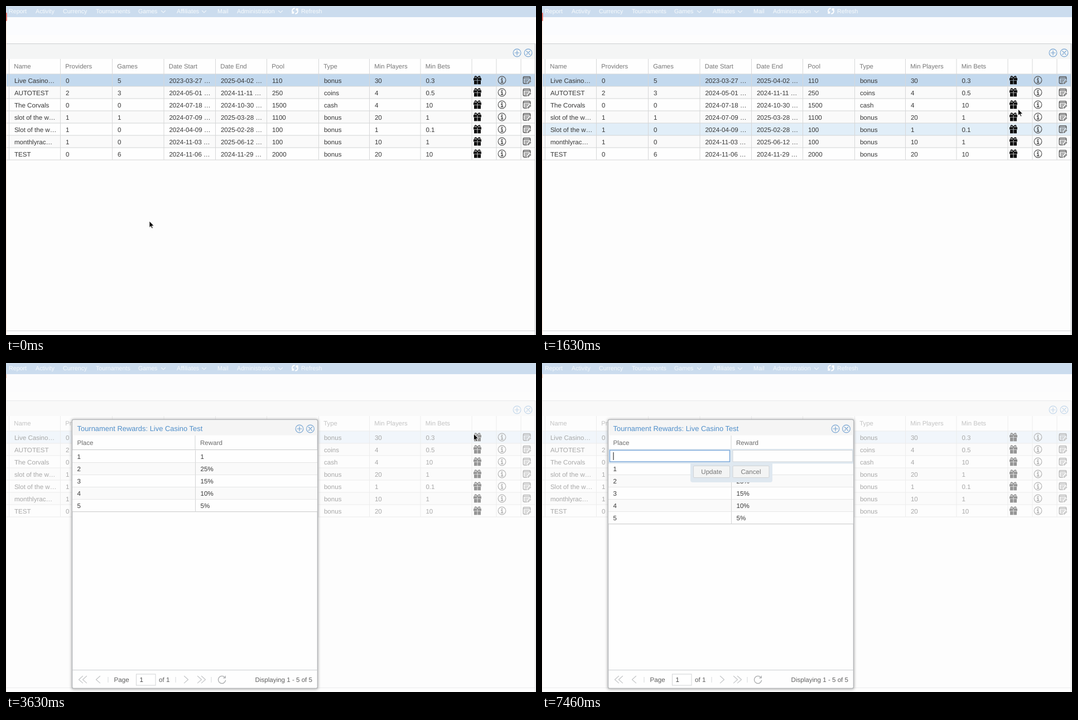
An HTML page that plays this animation: 950x590 px, repeating every 8 s.

```html
<!DOCTYPE html>
<html lang="en">
<head>
<meta charset="utf-8">
<title>Tournament rewards</title>
<style>
html, body { margin: 0; width: 100%; height: 100%; overflow: hidden; background: #fdfdfd; }
svg { display: block; width: 950px; height: 590px; font-family: "Liberation Sans", Arial, sans-serif; text-rendering: geometricPrecision; }
text { white-space: pre; }
</style>
</head>
<body>
<svg id="stage" viewBox="0 0 950 590"></svg>
<script>
const LOOP = 8000;
const stage = document.getElementById('stage');

const rect = (x, y, w, h, fill, more = '') => `<rect x="${x}" y="${y}" width="${w}" height="${h}" fill="${fill}" ${more}/>`;
const path = (d, stroke, width = 1, fill = 'none') =>
  `<path d="${d}" stroke="${stroke}" stroke-width="${width}" fill="${fill}" stroke-linecap="round" stroke-linejoin="round"/>`;
const text = (x, y, str, size, fill, more = '') => `<text x="${x}" y="${y}" font-size="${size}" fill="${fill}" ${more}>${str}</text>`;
const group = (id, body, more = '') => `<g id="${id}" ${more}>${body}</g>`;
const at = (x, y, body) => `<g transform="translate(${x} ${y})">${body}</g>`;
const each = (list, fn) => list.map(fn).join('');
const CENTER = 'text-anchor="middle"';

// Icons, drawn around their own centre
const circled = d => `<circle r="6.9" fill="none" stroke="#76a4d2" stroke-width="1.1"/>` + path(d, '#76a4d2', 1.2);
const plus = circled('M-4 0H4M0 -4V4');
const cross = circled('M-3 -3L3 3M3 -3L-3 3');
const gift = rect(-7, -3.8, 6.6, 4.2, '#0c0c0c') + rect(0.4, -3.8, 6.6, 4.2, '#0c0c0c') +
  rect(-6, 1, 5.6, 6.4, '#0c0c0c') + rect(0.4, 1, 5.6, 6.4, '#0c0c0c') +
  path('M-.6 -4C-2 -8 -5.5 -7.5 -4.4 -4.4M.6 -4C2 -8 5.5 -7.5 4.4 -4.4', '#0c0c0c', 1.7);
const info = `<circle r="6.8" fill="none" stroke="#555" stroke-width="1.2"/><circle cy="-3.4" r="1.2" fill="#444"/>` +
  path('M-1.4 -.8H.3V3.8M-1.6 3.8H1.8', '#444', 1.4);
const edit = path('M6.3 -1V-4.5Q6.3 -6.3 4.5 -6.3H-4.7Q-6.3 -6.3 -6.3 -4.5V4Q-6.3 6 -4.5 6H0M-6 -3.8H6', '#4c4c4c', 1.3) +
  path('M-3.7 -1H3.5M-3.7 1.2H2M-3.7 3.4H0', '#555', 1) + path('M2 6L2.6 3.8L6 .6L7.2 2L4 5.3Z', '#4c4c4c', 1, '#bbb');
const reload = (color, width) => path('M5 -4.4A6.6 6.6 0 1 0 6.6 1.2M6.2 -6.6V-3.2H2.8', color, width);
const sync = path('M-1 -4.8A4.8 4.8 0 0 0 -3.4 3.5M-5 3.8H-2.6V1.4M1 4.8A4.8 4.8 0 0 0 3.4 -3.5M5 -3.8H2.6V-1.4', '#fff', 1.9);

// Main page
const rows = [
  ['Live Casino…', '0', '5', '2023-03-27 …', '2025-04-02 …', '110', 'bonus', '30', '0.3'],
  ['AUTOTEST', '2', '3', '2024-05-01 …', '2024-11-11 …', '250', 'coins', '4', '0.5'],
  ['The Corvals', '0', '0', '2024-07-18 …', '2024-10-30 …', '1500', 'cash', '4', '10'],
  ['slot of the w…', '1', '1', '2024-07-09 …', '2025-03-28 …', '1100', 'bonus', '20', '1'],
  ['Slot of the w…', '1', '0', '2024-04-09 …', '2025-02-28 …', '100', 'bonus', '1', '0.1'],
  ['monthlyrac…', '1', '0', '2024-11-03 …', '2025-06-12 …', '100', 'bonus', '10', '1'],
  ['TEST', '0', '6', '2024-11-06 …', '2024-11-29 …', '2000', 'bonus', '20', '10'],
];
const heads = ['Name', 'Providers', 'Games', 'Date Start', 'Date End', 'Pool', 'Type', 'Min Players', 'Min Bets'];
const edges = [5.5, 97.5, 190.5, 283, 375.5, 467.5, 560.5, 651.5, 743, 835, 879, 923];
const rowTop = i => 122 + 22 * i;

const page =
  rect(0, 0, 950, 590, '#fdfdfd') + rect(0, 20, 950, 32, '#fbfcfe') +
  rect(0, 67, 949, 28, '#f4f5f5') + rect(0, 67, 949, 1.2, '#d2d4d6') +
  rect(0, 95, 948, 27, '#fefefe') +
  each(rows, (r, i) => rect(0, rowTop(i), 948, 22, i % 2 ? '#fafafa' : '#fefefe', `id="row${i}"`)) +
  each(rows, (r, i) => rect(0, rowTop(i) + 21.5, 948, 1, '#d4d5d6')) + rect(0, 121.5, 948, 1, '#d4d8dc') +
  each(edges, x => rect(x - .5, 95, 1, 181, '#d6d7d8')) +
  each(heads, (h, i) => text(edges[i] + 8.7, 112, h, 11.4, '#777')) +
  each(rows, (r, i) => each(r, (c, j) => text(edges[j] + 9.4, rowTop(i) + 15.5, c, 11.6, '#383838')) +
    at(845, rowTop(i) + 11, gift) + at(889, rowTop(i) + 11, info) + at(933.5, rowTop(i) + 11, edit)) +
  at(916, 84, plus) + at(936, 84, cross) +
  rect(0, 582, 948, 1, '#d6d7d8') + rect(947.8, 67, 1.4, 523, '#c6c8ca') + rect(0, 20, 1, 570, '#fbe3d6');

const menu = [[5, 'Report'], [53, 'Activity'], [102, 'Currency'], [161, 'Tournaments'], [237, 'Games', 282],
  [306, 'Affiliates', 355], [379, 'Mail'], [414, 'Administration', 492], [529, 'Refresh']];
const nav = rect(0, 0, 950, 20, '#cbdcee') + rect(0, 0, 950, 1, '#d3e0ed') +
  each(menu, ([x, label, arrow]) => text(x, 12.8, label, 10.7, '#f8fbfd') +
    (arrow ? path(`M${arrow - 3.5} 8.5l3.5 3.4l3.5 -3.4`, '#f0f5fa', 1.2) : '')) + at(518, 9, sync);

// Rewards window
const rewards = ['1', '25%', '15%', '10%', '5%'];
const rewardRows = each(rewards, (r, i) => {
  const y = 156.5 + 22 * i;
  return rect(119, y, 439, 22, i % 2 ? '#fafafa' : '#fefefe') + rect(119, y + 21.6, 439, 1.1, '#cbcccd') +
    rect(339, y, 1, 22, '#d2d3d4') + text(127.5, y + 15.3, i + 1, 11.6, '#383838') + text(348.5, y + 15.3, r, 11.6, '#383838');
});
const button = (x, label) => rect(x + .5, 184.5, 65, 21, '#f3f4f4', 'stroke="#d0d3d5" rx="1.5"') +
  text(x + 33, 199, label, 11.6, '#777', CENTER);
const editor = rect(119, 154, 439, 26.5, '#dfe9f1') +
  '<path d="M266 180H413V210Q413 214 409 214H270Q266 214 266 210Z" fill="#dfe8f0"/>' +
  rect(121.5, 156.5, 215, 20.5, '#fff', 'stroke="#78a6d9" stroke-width="1.4"') +
  rect(342, 156.5, 214.5, 20.5, '#fefefe', 'stroke="#d3d6d9"') +
  button(271, 'Update') + button(341.5, 'Cancel') + rect(127.5, 160, 1.1, 14, '#222', 'id="caret"');
const chevron = (x, dir) => path(`M${x + 3.5 * dir} 561.5l${-7 * dir} 6.2l${7 * dir} 6.2`, '#c3c5c7', 1.2);
const pager = rect(119, 550, 439, 1.2, '#d2d4d6') +
  chevron(134, 1) + chevron(141, 1) + chevron(165, 1) + chevron(323, -1) + chevron(347, -1) + chevron(354, -1) +
  each([183, 304, 368], x => rect(x - .5, 563, 1, 10, '#d6d8da')) +
  text(193.5, 572, 'Page', 11.7, '#606060') + rect(233.5, 558, 34.5, 20, '#fff', 'stroke="#d2d4d6"') +
  text(239.5, 572, '1', 11.7, '#444') + text(274, 572, 'of 1', 11.7, '#606060') +
  at(387, 568, reload('#a8aaac', 1.3)) + text(549, 572, 'Displaying 1 - 5 of 5', 11.6, '#606060', 'text-anchor="end"');
const spokes = each([...Array(8).keys()], i =>
  `<path d="M0 -3.6V-6.4" stroke="#333" stroke-width="2" opacity="${(.15 + i * .11).toFixed(2)}" transform="rotate(${i * 45})"/>`);
const loading = rect(119, 130, 439, 453, '#fefefe', 'opacity=".6"') +
  rect(122, 543.5, 434, 6, '#dcdddf', 'rx="3"') + rect(306, 334.5, 65, 45.5, '#e0e0e1', 'rx="1.5"') +
  at(338, 348.5, group('spinner', spokes)) + text(338.5, 370.8, 'Loading...', 12, '#666', CENTER);
const dialog =
  rect(118.5, 101.5, 440, 482, '#fefefe', 'rx="2.5" stroke="#b2b4b6" stroke-width="1.5" filter="url(#shadow)"') +
  rect(119.2, 102.2, 438.6, 27.3, '#f5f5f5', 'rx="2"') +
  text(127.5, 122.3, 'Tournament Rewards: Live Casino Test', 12.95, '#508fca') +
  at(526, 118, plus) + at(545.5, 118, cross) +
  text(127.5, 146.5, 'Place', 11.6, '#6c6c6c') + text(348, 146.5, 'Reward', 11.6, '#6c6c6c') +
  rect(338.5, 130, 1, 26, '#d2d3d4') + rect(119, 155, 439, 1.1, '#cbcccd') +
  group('rewards', rewardRows) + pager + group('editor', editor) + group('loading', loading);

const arrow = path('M0 0V11.3L2.6 8.9L4.5 13L6.3 12.2L4.5 8.2H8Z', '#fff', .8, '#000');
const hand = path('M1 7.5V1.4Q1 0 2.1 0T3.2 1.4V5Q5 4.2 5.3 5.4Q7 4.8 7.3 6Q9 5.6 9.2 7.2V10Q9 12.5 7.9 14H2.8Q1 11.5 -1.8 8.8Q-2.6 7.4 -1 7.2Z', '#111', 1.1, '#fff') +
  path('M3.7 8.5V11.5M5.5 8.5V11.5', '#111', .8);

stage.innerHTML =
  '<defs><filter id="shadow" x="-5%" y="-5%" width="110%" height="110%"><feDropShadow dx="0" dy=".5" stdDeviation="2.6" flood-color="#000" flood-opacity=".4"/></filter></defs>' +
  page + group('mask', rect(0, 20, 950, 570, '#fefefe', 'opacity=".57"')) + nav +
  rect(0, 12, 1.8, 15, '#e3655c', 'id="mark" rx=".8"') + rect(0, 20, 1.2, 7, '#f6c9b4', 'id="paleMark"') +
  group('dialog', dialog) + group('cursor', group('arrow', arrow) + group('hand', hand));

const el = Object.fromEntries([...stage.querySelectorAll('[id]')].map(n => [n.id, n]));
const show = (id, on) => el[id].setAttribute('visibility', on ? 'inherit' : 'hidden');

// Pointer path: time, x, y
const track = [[0, 257, 386], [1010, 257, 386], [1130, 360, 376], [1300, 665, 312], [1400, 802, 262], [1460, 836, 245.5],
  [1530, 837, 244], [1640, 855, 180], [1750, 861.5, 142], [1830, 862.5, 139.5], [2000, 850, 132], [2100, 847.5, 130.5],
  [3600, 847.5, 130.5], [3630, 839, 127.5], [3800, 752, 123], [4050, 620, 121], [4250, 550, 119], [4430, 528, 117],
  [4700, 524.5, 116], [7110, 524.5, 116], [7250, 440, 146], [7430, 300, 165], [LOOP, 300, 165]];
function pointer(t) {
  const i = Math.max(1, track.findIndex(p => p[0] >= t));
  const [t0, x0, y0] = track[i - 1], [t1, x1, y1] = track[i];
  const k = (t - t0) / (t1 - t0);
  return [x0 + (x1 - x0) * k, y0 + (y1 - y0) * k];
}

function draw(t) {
  const open = t >= 2230, editing = t >= 5130, busy = open && t < 3030;
  const [x, y] = pointer(t);
  // The row highlight trails the pointer a little
  const hovered = open ? 0 : Math.floor((pointer(Math.max(0, t - 60))[1] - 122) / 22);
  rows.forEach((r, i) => el['row' + i].setAttribute('fill',
    i === hovered ? '#e1eef8' : i === 0 ? '#c3d9ee' : i % 2 ? '#fafafa' : '#fefefe'));

  show('mask', open);
  show('mark', !open);
  show('paleMark', open);
  show('dialog', open);
  show('loading', busy);
  show('rewards', open && t >= 2400);
  show('editor', editing);
  show('caret', editing && !(t >= 5730 && t < 6160));
  el.rewards.setAttribute('transform', `translate(0 ${editing ? 22 : 0})`);
  el.spinner.setAttribute('transform', `rotate(${45 * Math.floor((t - 2460) / 185)})`);

  const onIcon = t >= 4440 && t < 7150;
  show('cursor', t < 7430);
  show('arrow', !onIcon);
  show('hand', onIcon);
  el.cursor.setAttribute('transform', `translate(${x.toFixed(1)} ${y.toFixed(1)})`);
}

const start = performance.now();
function tick(now) {
  draw(Math.max(0, now - start) % LOOP);
  requestAnimationFrame(tick);
}
draw(0);
requestAnimationFrame(tick);
</script>
</body>
</html>
```
